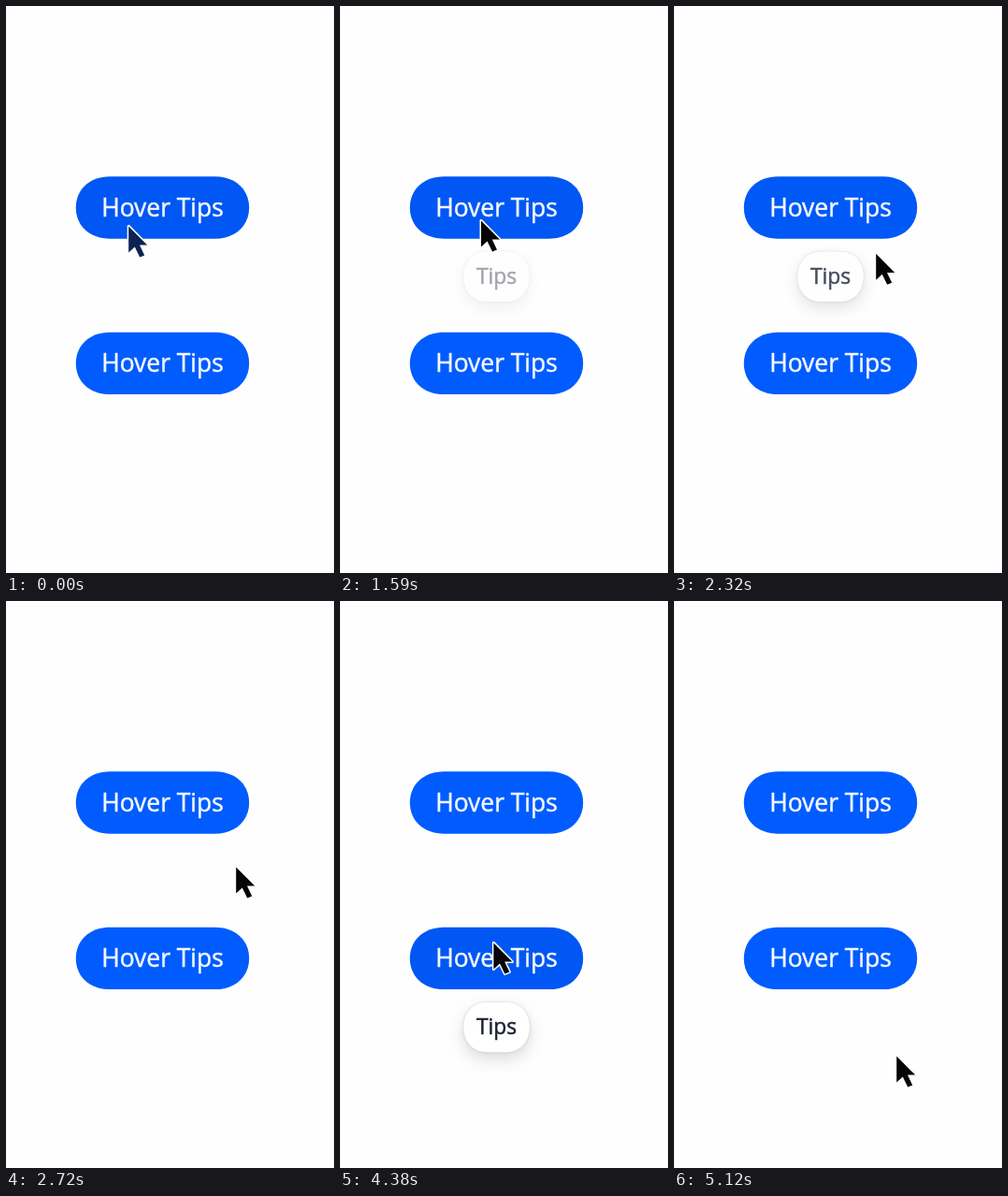
Write an HTML page that moves like this. It is 351 px wide and 606 px high and loops after 5520 ms.

```html
<!DOCTYPE html>
<html lang="en">
<head>
<meta charset="utf-8">
<title>Hover tips</title>
<style>
  html, body { margin: 0; width: 100%; height: 100%; overflow: hidden; background: #fefefe; }
  svg { display: block; width: 351px; height: 606px; }
  text { font-family: "Open Sans", "Noto Sans", sans-serif; text-anchor: middle; stroke-width: .5px; }
  .label { font-size: 26.4px; fill: #f4f8ff; stroke: #f4f8ff; }
  .tip { filter: drop-shadow(0 7px 9px rgba(0, 0, 0, .13)) drop-shadow(0 0 1.5px rgba(0, 0, 0, .16)); }
  .tip text { font-size: 22.8px; fill: #1b2233; stroke: #1b2233; }
</style>
</head>
<body>
<svg viewBox="0 0 351 606">
  <defs>
    <path id="pill" d="M-56 -33.2H56C79 -33.2 92.7 -18.5 92.7 0S79 33.2 56 33.2H-56C-79 33.2 -92.7 18.5 -92.7 0S-79 -33.2 -56 -33.2Z"/>
    <path id="bubble" d="M-10 -26.7H10C26 -26.7 35.3 -15 35.3 0S26 26.7 10 26.7H-10C-26 26.7 -35.3 15 -35.3 0S-26 -26.7 -10 -26.7Z"/>
  </defs>
  <g id="widgets"></g>
  <path id="cursor" d="M0 0V28L6.6 22L12 33L17 31L11.8 20.2H20Z"
        stroke="#fff" stroke-width="3" stroke-linejoin="round" paint-order="stroke"/>
</svg>
<script>
  // Times are counted in screen refreshes of TICK milliseconds.
  const LOOP = 5520, TICK = 66.4;

  const home = { x: 131.2, y: 235.4 };
  const moves = [
    { start: 14, end: 17, x: 151, y: 229.4 },
    { start: 26, end: 30, x: 174.2, y: 237.4 },
    { start: 30, end: 39, x: 246.2, y: 284.4 },
    { start: 43, end: 48, x: 167.2, y: 356.4 },
    { start: 51, end: 56, x: 164.4, y: 365.4 },
    { start: 67, end: 76, x: 238.2, y: 486.4 }
  ];
  const widgets = [
    { y: 215.5, enter: -4, show: 22, leave: 34 },
    { y: 381.9, enter: 51, show: 61, leave: 71 }
  ];

  const mix = (a, b, p) => a + (b - a) * p;
  const ramp = (tick, start, length) => Math.min(1, Math.max(0, (tick - start) / length));
  const easeOut = p => 1 - (1 - p) ** 2;
  const smooth = p => p * p * (3 - 2 * p);

  document.getElementById("widgets").innerHTML = widgets.map(({ y }) => `
    <g transform="translate(167.5 ${y})">
      <use class="button" href="#pill"/>
      <text class="label" y="9.3">Hover Tips</text>
      <g class="tip" transform="translate(0 73.7)">
        <use href="#bubble" fill="#fff"/><text y="7.8">Tips</text>
      </g>
    </g>`).join("");

  const buttons = document.querySelectorAll(".button");
  const tips = document.querySelectorAll(".tip");
  const cursor = document.getElementById("cursor");

  function cursorAt(tick) {
    return moves.reduce((from, to, i) => {
      const ease = i ? smooth : easeOut;
      const p = ease(ramp(tick, to.start, to.end - to.start));
      return { x: mix(from.x, to.x, p), y: mix(from.y, to.y, p) };
    }, home);
  }

  function render(time) {
    const tick = Math.floor((time % LOOP + 6) / TICK);
    widgets.forEach(({ enter, show, leave }, i) => {
      const hover = ramp(tick, enter, 4) - ramp(tick, leave, 3);
      const opacity = ramp(tick, show, 5) - ramp(tick, leave, 5);
      buttons[i].setAttribute("fill", `rgb(0 ${mix(92, 87, hover)} ${mix(255, 243, hover)})`);
      tips[i].setAttribute("opacity", opacity);
    });
    const { x, y } = cursorAt(tick);
    cursor.setAttribute("transform", `translate(${x} ${y})`);
    cursor.setAttribute("fill", tick > moves[0].start ? "#050505" : "#0b2350");
  }

  const start = performance.now();
  function frame() {
    render(performance.now() - start);
    requestAnimationFrame(frame);
  }
  frame();
</script>
</body>
</html>
```
